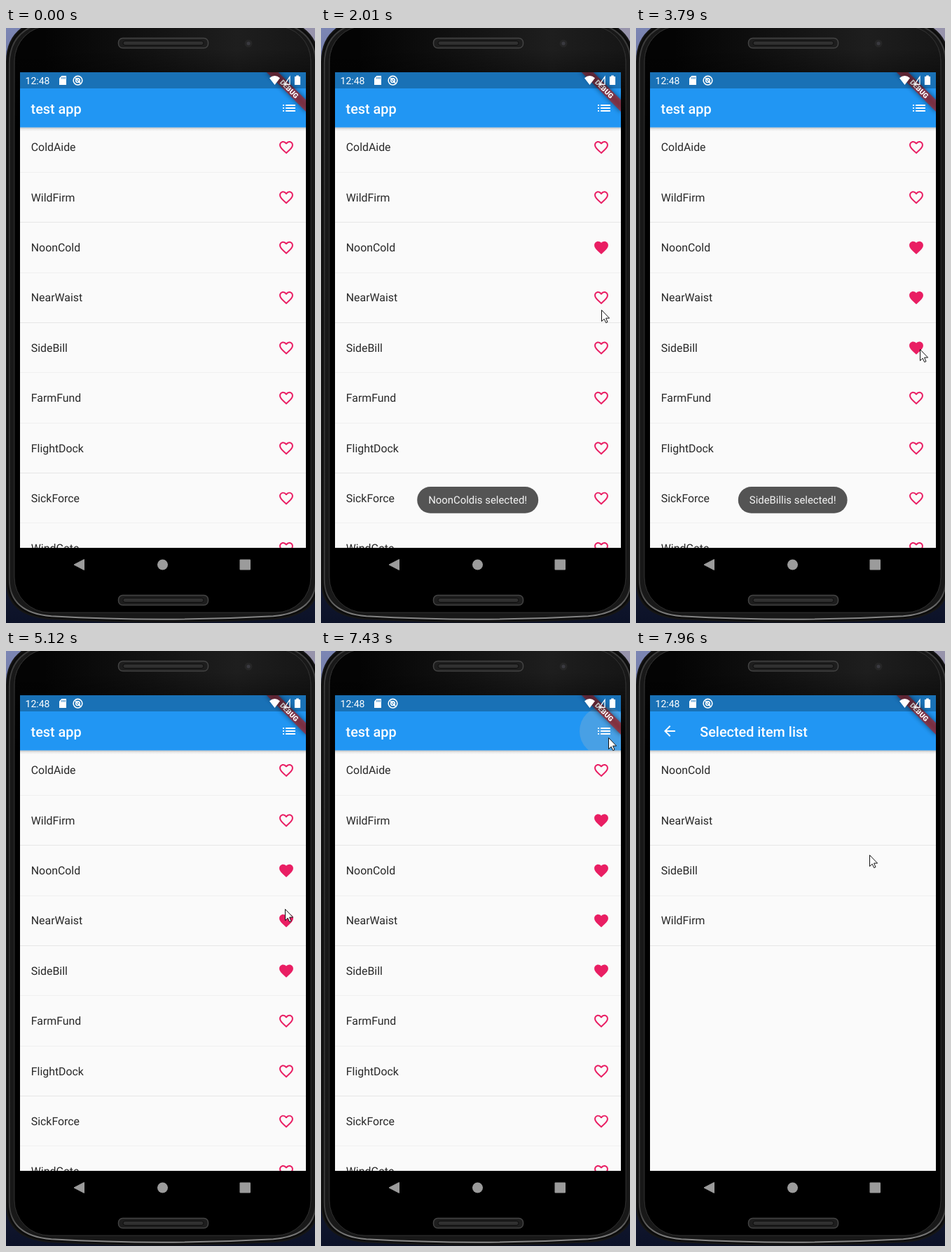
An HTML page that plays this animation: 441x847 px, repeating every 8000 ms.

```html
<!DOCTYPE html>
<html lang="en">
<head>
<meta charset="utf-8">
<title>test app</title>
<style>
  html, body { margin: 0; width: 100%; height: 100%; overflow: hidden; background: #10162c; }
  svg { display: block; }
  text { font-family: Roboto, sans-serif; text-rendering: geometricPrecision; }
  .item { font-size: 15.87px; fill: #282828; }
  .title { font-size: 19.84px; font-weight: 500; fill: #fff; }
  .heart { fill: #e91e63; }
</style>
</head>
<body>
<script>
const LOOP = 8000, STEP = 77.5, FIRST = 150;
const ROW = 71.38, TOP = 169.9, ICON = 0.992;
const NAMES = ['ColdAide', 'WildFirm', 'NoonCold', 'NearWaist', 'SideBill',
  'FarmFund', 'FlightDock', 'SickForce', 'WindGate'];

// row tapped, moment of the tap, life of its toast, whether a splash shows
const TAPS = [
  { row: 2, at: 1460, from: 1530, to: 2780, splash: true },
  { row: 3, at: 2705, from: 2780, to: 3630, splash: true },
  { row: 4, at: 3630, from: 3600, to: 5105, splash: false },
  { row: 1, at: 5640, from: 5700, to: 6575, splash: true }
];
// time, x, y
const POINTER = [
  [150, 365, 667], [227, 377, 539], [462, 377, 539], [1312, 405, 307], [1620, 405, 307],
  [2010, 400, 401], [2320, 400, 401], [2550, 401, 398], [2940, 401, 398], [3092, 405, 453],
  [3170, 405, 453], [3250, 405, 457], [4262, 405, 457], [4800, 394, 390], [5032, 394, 390],
  [5110, 398, 367], [5500, 390, 231], [5885, 390, 231], [6040, 398, 227], [6117, 398, 227],
  [6350, 411, 133], [6505, 411, 133], [6815, 410, 123], [7667, 410, 123], [7977, 333, 290]
];
const PUSH = 7500, PUSH_TIME = 300;

const BODY = 'M1 48C1 22 12 4 34 -6H412C434 4 446 22 446 48V788C446 822 422 838 384 841Q223 850 62 841C24 838 1 822 1 788Z';
const HEART = 'M12 21.35l-1.45-1.32C5.4 15.36 2 12.28 2 8.5 2 5.42 4.42 3 7.5 3c1.74 0 3.41.81 4.5 2.09C13.09 3.81 14.76 3 16.5 3 19.58 3 22 5.42 22 8.5c0 3.78-3.4 6.86-8.55 11.54z';
const HOLLOW = 'M12.1 18.55l-.1.1-.1-.1C7.14 14.24 4 11.39 4 8.5 4 6.5 5.5 5 7.5 5c1.54 0 3.04.99 3.57 2.36h1.87C13.46 5.99 14.96 5 16.5 5c2 0 3.5 1.5 3.5 3.5 0 2.89-3.14 5.74-7.9 10.05z';
const LIST = 'M3 13h2v-2H3zm0 4h2v-2H3zm0-8h2V7H3zm4 4h14v-2H7zm0 4h14v-2H7zM7 7v2h14V7z';
const BACK = 'M20 11H7.83l5.59-5.59L12 4l-8 8 8 8 1.41-1.41L7.83 13H20z';

const rowY = i => TOP + ROW * i;
const icon = (x, y, d, attrs) =>
  `<path ${attrs} fill-rule="evenodd" transform="translate(${x} ${y}) scale(${ICON}) translate(-12 -12)" d="${d}"/>`;
const divider = i =>
  `<rect x="20" y="${Math.floor(205.3 + ROW * i)}" width="408" height="1" opacity="${[1, 3, 6].includes(i) ? 0.08 : 0.04}"/>`;
const item = (name, i) =>
  `<text class="item" x="35.8" y="${rowY(i) + 5.4}">${name}</text>${divider(i)}`;
const page = (title, titleX, body, bar) => `
  <rect x="20" y="63" width="408" height="677" fill="#fafafa"/>${body}
  <rect x="20" y="141.5" width="408" height="5.5" fill="url(#shade)"/>
  <rect x="20" y="63" width="408" height="78.5" fill="#2196f3"/>${bar}
  <text class="title" x="${titleX}" y="121.7">${title}</text>`;
const speaker = y => `
  <rect x="160.5" y="${y}" width="128" height="14" rx="6" fill="#1e1e1e" stroke="#434343" stroke-width="1.5"/>
  <rect x="167" y="${y + 4}" width="115" height="6" rx="3" fill="#303030" stroke="#0c0c0c"/>`;

const home = page('test app', 35.6,
  NAMES.map((name, i) => item(name, i) + icon(400, rowY(i), HEART + HOLLOW, 'class="heart"')).join('') +
  `<svg id="splashRow" x="20" width="408" height="71" overflow="hidden"><circle id="splash" cx="380" cy="35.5" fill="#999"/></svg>`,
  `<svg x="20" y="63" width="408" height="78.5" overflow="hidden"><circle id="press" cx="384" cy="51" r="35" fill="#bcbcbc"/></svg>` +
  icon(404, 114, LIST, 'fill="#fff"'));
const selected = page('Selected item list', 91.2,
  TAPS.map((tap, i) => item(NAMES[tap.row], i)).join(''), icon(48, 114, BACK, 'fill="#fff"'));

document.body.innerHTML = `
<svg width="441" height="847" viewBox="0 0 441 847">
  <defs>
    <linearGradient id="sky" x2="0" y2="1">
      <stop stop-color="#7c86b4"/><stop offset=".3" stop-color="#4a5276"/><stop offset="1" stop-color="#0c1228"/>
    </linearGradient>
    <linearGradient id="rim" x2="0" y2="1">
      <stop stop-color="#3c3c3c"/><stop offset=".5" stop-color="#2c2c2c"/>
      <stop offset=".95" stop-color="#3c3c3c"/><stop offset="1" stop-color="#8a8a8a"/>
    </linearGradient>
    <linearGradient id="gloss">
      <stop offset=".1" stop-color="#040404"/><stop offset=".75" stop-color="#1e1e1e"/><stop offset="1" stop-color="#161616"/>
    </linearGradient>
    <linearGradient id="panel" x2="0" y2="1">
      <stop offset=".04" stop-opacity="0"/><stop offset=".17"/><stop offset="1"/>
    </linearGradient>
    <linearGradient id="shade" x2="0" y2="1">
      <stop stop-opacity=".26"/><stop offset=".4" stop-opacity=".08"/><stop offset="1" stop-opacity="0"/>
    </linearGradient>
    <filter id="blur" x="-.2" y="-1" width="1.4" height="3"><feGaussianBlur stdDeviation="3.5"/></filter>
    <clipPath id="screen"><rect x="20" y="63" width="408" height="677"/></clipPath>
  </defs>
  <rect width="441" height="847" fill="url(#sky)"/>
  <rect x="380" width="61" height="40" fill="#a39aa8" opacity=".7"/>
  <path d="${BODY}" fill="#0c0c0c" stroke="#161616" stroke-width="2"/>
  <path d="${BODY}" fill="#181818" stroke="url(#rim)" stroke-width="2" transform="translate(223.5 420) scale(.983 .991) translate(-223.5 -420)"/>
  <g stroke="#2d2d2d">
    <rect x="12" y="-3" width="423" height="835" rx="50" fill="url(#gloss)"/>
    <rect x="12" y="-3" width="423" height="835" rx="50" fill="url(#panel)"/>
  </g>
  ${speaker(14.5)}${speaker(807.5)}
  <circle cx="346" cy="22" r="5.5" fill="#262626"/><circle cx="346" cy="22" r="2.5" fill="#3a3a40"/>
  <rect x="20" y="740" width="408" height="48"/>
  <g fill="#9b9b9b">
    <path d="M97 764L111.5 756.5V771.5Z" stroke="#9b9b9b" stroke-linejoin="round"/>
    <circle cx="223.5" cy="764" r="7.5"/>
    <rect x="333.5" y="756.5" width="15.5" height="15" rx="1"/>
  </g>
  <g clip-path="url(#screen)">
    ${home}
    <g id="selected">${selected}</g>
    <g transform="translate(428 63) scale(${ICON}) rotate(45)">
      <rect x="-40" y="28" width="80" height="12" opacity=".5" filter="url(#blur)"/>
      <rect x="-40" y="28" width="80" height="12" fill="#b71c1c" fill-opacity=".63"/>
      <text y="37.6" text-anchor="middle" font-size="10.2" font-weight="900" fill="#fff">DEBUG</text>
    </g>
  </g>
  <rect x="20" y="63" width="408" height="23" opacity=".25"/>
  <g fill="#fff">
    <text x="27.6" y="80" font-size="14">12:48</text>
    <path d="M79.5 68H86V81H76V71.5Z"/>
    <path d="M79.8 70v2.5M82 70v2.5M84.2 70v2.5" stroke="#1971b6"/>
    <g fill="none" stroke="#fff" stroke-width="1.6">
      <circle cx="102.5" cy="74.7" r="6.3"/><circle cx="102.5" cy="74.7" r="2.8"/><path d="M99 71L107 79.5"/>
    </g>
    <path d="M383.5 81L376 71.2Q383.5 64.8 391 71.2Z"/>
    <path d="M397.5 80.3H405V69.5Z" fill="none" stroke="#fff" stroke-width="1.3"/>
    <path d="M414.2 67.5h3.6v1.5h1.7q.6 0 .6.6V80.4q0 .6-.6.6h-7q-.6 0-.6-.6V69.6q0-.6.6-.6h1.7Z"/>
  </g>
  <g id="toast">
    <rect id="pill" y="653" height="37.7" rx="18.8" fill="#545454"/>
    <text id="message" x="223.7" y="677" text-anchor="middle" font-size="14.9" fill="#f4f4f4"></text>
  </g>
  <path id="pointer" d="M.5.6V16.6L4.2 13.2 6.7 18.6 9 17.6 6.6 12.1H11.6Z" fill="#fff" stroke="#111"/>
</svg>`;

const el = id => document.getElementById(id);
const set = (id, attrs) => Object.entries(attrs).forEach(([key, value]) => el(id).setAttribute(key, value));
const clamp = v => Math.max(0, Math.min(1, v));
const hearts = document.querySelectorAll('.heart');

function pointerAt(t) {
  const next = POINTER.findIndex(key => key[0] > t);
  if (next < 1) return POINTER[next < 0 ? POINTER.length - 1 : 0].slice(1);
  const [t0, x0, y0] = POINTER[next - 1], [t1, x1, y1] = POINTER[next];
  const p = (t - t0) / (t1 - t0), e = p * p * (3 - 2 * p);
  return [Math.round(x0 + (x1 - x0) * e), Math.round(y0 + (y1 - y0) * e)];
}

function showToast(t) {
  const tap = TAPS.find(({ from, to }) => t >= from && t < to);
  set('toast', { opacity: tap ? clamp((t - tap.from) / 150) : 0 });
  if (!tap) return;
  el('message').textContent = NAMES[tap.row] + 'is selected!';
  const width = el('message').getComputedTextLength() + 32;
  set('pill', { x: 223.7 - width / 2, width });
}

function showSplash(t) {
  const tap = TAPS.find(({ at, splash }) => splash && t >= at && t < at + 250);
  set('splash', { opacity: 0 });
  if (!tap) return;
  const age = t - tap.at;
  set('splashRow', { y: rowY(tap.row) - 35.5 });
  set('splash', { r: 40 + age * 0.6, opacity: 0.2 * (1 - age / 250) });
}

function draw(now) {
  const time = now % LOOP;
  const t = FIRST + Math.floor((time - FIRST) / STEP + 0.25) * STEP;

  hearts.forEach((heart, row) => {
    const liked = TAPS.some(tap => tap.row === row && t >= tap.at);
    heart.setAttribute('d', liked ? HEART : HEART + HOLLOW);
  });
  showSplash(t);
  showToast(t);
  set('press', { opacity: 0.25 * clamp((t - 7205) / 230) * clamp((7750 - t) / 200) });

  const push = clamp((t - PUSH) / PUSH_TIME);
  set('selected', {
    opacity: push ** 1.7,
    transform: `translate(0 ${170 * (1 - push) ** 3})`
  });

  const [x, y] = pointerAt(t);
  set('pointer', { transform: `translate(${x} ${y})`, opacity: time < FIRST ? 0 : 1 });
  requestAnimationFrame(frame);
}

const start = performance.now();
function frame() { draw(performance.now() - start); }
frame();
</script>
</body>
</html>
```
